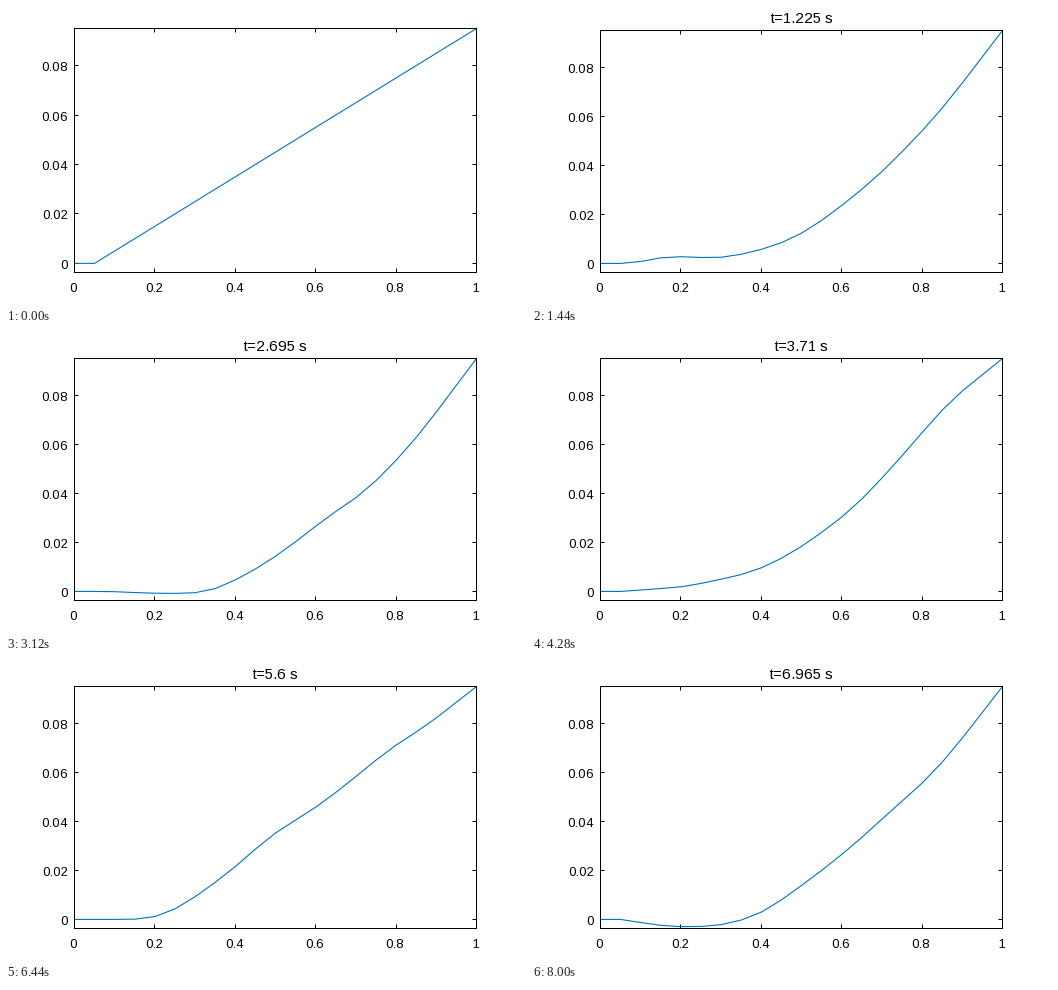
Animation of 520 by 300 pixels, one loop 8.04 s. Source, as a matplotlib script:

```python
import numpy as np
import matplotlib.pyplot as plt
from matplotlib.animation import FuncAnimation
from matplotlib.transforms import Affine2D

W, H, DPI = 520, 300, 100
PX = 72 / DPI                 # one pixel in points
FRAMES, INTERVAL = 201, 40

# Elastic beam: clamped at the left, lifted and hinged at the right
N = 20
STIFFNESS = 5.0
DT, SUBSTEPS = 0.0005, 70
DX = 1 / N
R = STIFFNESS * DT**2 / DX**4

plt.rcParams["font.family"] = "Liberation Sans"
plt.rcParams["text.hinting_factor"] = 1     # whole-pixel glyph spacing


def simulate(count):
    """Beam shapes at every SUBSTEPS-th time step, starting at rest."""
    u = np.maximum(0, 0.1 * (x - DX))
    prev = u.copy()
    prev[2:-2] -= R / 2 * np.diff(u, 4)
    shapes = [u]
    for _ in range(count - 1):
        for _ in range(SUBSTEPS):
            new = u.copy()
            new[2:-2] = 2 * u[2:-2] - prev[2:-2] - R * np.diff(u, 4)
            new[-2] = (new[-1] + new[-3]) / 2
            prev, u = u, new
        shapes.append(u)
    return shapes


def shifted(base, dx, dy):
    return base + Affine2D().translate(dx, dy)


def place(top):
    ax.set_position([68 / W, 34 / H, 402 / W, (top - 34) / H])


x = np.linspace(0, 1, N + 1)
shapes = simulate(FRAMES - 1)

fig = plt.figure(figsize=(W / DPI, H / DPI), dpi=DPI, facecolor="white")
ax = fig.add_axes([0.13, 0.11, 0.77, 0.81])
place(278)
ax.set(xlim=(0, 1), ylim=(-0.0037, 0.095))
xticks = [0, 0.2, 0.4, 0.6, 0.8, 1]
yticks = [0, 0.02, 0.04, 0.06, 0.08]
ax.set_xticks(xticks)
ax.set_yticks(yticks)
ax.tick_params(direction="in", length=4 * PX, width=PX, color="black",
               top=True, right=True, labelbottom=False, labelleft=False)
for spine in ax.spines.values():
    spine.set(linewidth=PX, color="black")

label = dict(fontsize=13 * PX, va="baseline", color="black")
for v in xticks:
    ax.text(v, 0, f"{v:g}", ha="center", **label,
            transform=shifted(ax.get_xaxis_transform(), -0.5, -20))
for v in yticks:
    ax.text(0, v, f"{v:g}", ha="right", **label,
            transform=shifted(ax.transData, -6, -6))

title = fig.text(269.5 / W, 283 / H, "", fontsize=15 * PX,
                 ha="center", va="baseline", color="black")
curve, = ax.plot(x, shapes[0], color="#0072BD", lw=1.1 * PX)
curve.set_transform(shifted(ax.transData, 0.5, -0.5))


def update(i):
    k = max(i - 1, 0)
    place(276 if i else 278)
    title.set_text(f"t={k * SUBSTEPS * DT:g} s" if i else "")
    curve.set_ydata(shapes[k])
    return curve, title


anim = FuncAnimation(fig, update, frames=FRAMES, interval=INTERVAL,
                     repeat=True, repeat_delay=0, blit=False)
plt.show()
```
